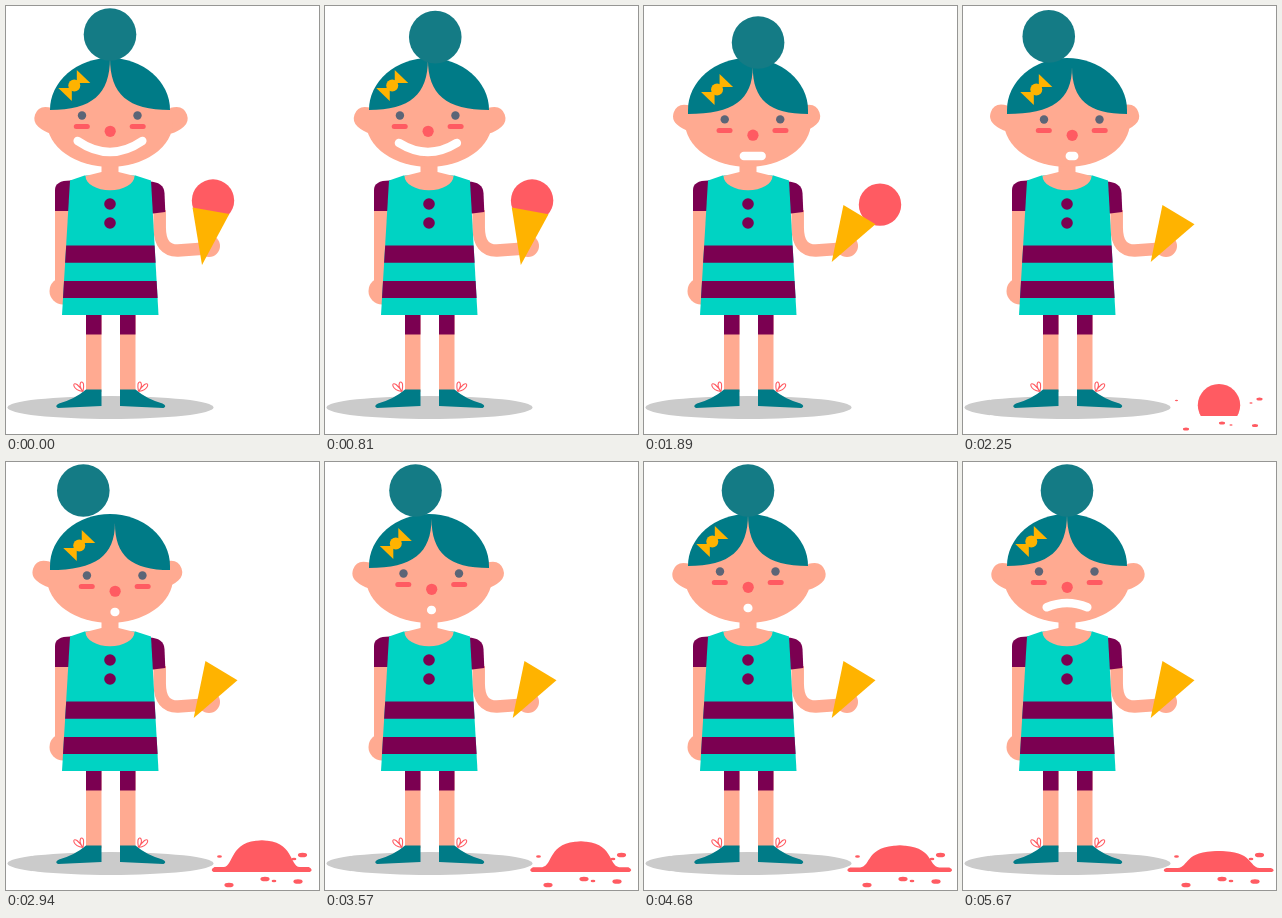
Recreate the animation shown at these times as an HTML page. Size 313x428 px, loop 5.7 s.

```html
<!DOCTYPE html>
<html lang="en">
<head>
<meta charset="utf-8">
<title>Dropped ice cream</title>
<style>
  html, body { margin: 0; width: 100%; height: 100%; overflow: hidden; background: #fff; }
  svg { display: block; width: 100%; height: 100%; }
  .skin { fill: #ffaa91; }
  .hair { fill: #007b87; }
  .plum { fill: #7b0051; }
  .mint { fill: #00d3c3; }
  .coral { fill: #ff5b62; }
  .gold { fill: #ffb300; }
  .eye { fill: #5b6577; }
  .lace { fill: none; stroke: #ff5b62; stroke-width: 1.1; }
</style>
</head>
<body>
<svg viewBox="0 0 313 428">
  <defs>
    <clipPath id="floor"><path d="M0 0H313V410H0Z"/></clipPath>
    <clipPath id="dome"><path d="M44 104A60 52 0 0 1 164 104V112H44Z"/></clipPath>
    <g id="leg">
      <path class="skin" d="M80 309H95.5V386H80Z"/>
      <path class="plum" d="M80 309H95.5V328.5H80Z"/>
      <path class="hair" d="M80 383.5H95.5V400L52 402Q48 400 53 397.5Q69 393 80 383.5Z"/>
      <path class="lace" d="M77 385.500C66 384 66 375 71 378.500Q74 381 77 385.500C71 378 76 373 77.500 378Q78 381 77 385.500"/>
    </g>
    <path id="ear" class="skin" d="M-6 -10.500Q-3 -11.300 0 -11.300A11.300 11.300 0 0 1 7 8.500Q2 13 -6 15.500L-14 0Z"/>
    <path id="wing" class="gold" d="M2.500 -2.500V-15.500L16 -2.500Z"/>
    <g id="cheek">
      <circle class="eye" cx="27.500" cy="109.500" r="4.200"/>
      <rect class="coral" x="19.700" y="118" width="16" height="5" rx="2.500"/>
    </g>
  </defs>

  <ellipse cx="104.500" cy="401.500" rx="103" ry="11.500" fill="#cbcbcb"/>
  <use href="#leg"/>
  <use href="#leg" transform="translate(209.500 0) scale(-1 1)"/>

  <circle class="skin" cx="57" cy="285" r="13.500"/>
  <path class="skin" d="M49 203H63V285H49Z"/>
  <path d="M153.700 204V222Q154 245 172 244.500L200 242.500" fill="none" stroke="#ffaa91" stroke-width="12.500"/>
  <circle class="skin" cx="203" cy="240" r="11"/>
  <path class="plum" d="M66 174.500Q49 174 49 184V205H66Z"/>
  <path class="plum" d="M143 175.500Q158 176 158.500 187L159.300 206L143 208Z"/>
  <path class="mint" d="M64 174.500L80 169H128L145 174.500L152.500 309H56Z"/>
  <path class="plum" d="M60.200 239.400H148.600L149.600 256.700H59.100ZM58 275H150.600L151.600 292H57Z"/>
  <circle class="plum" cx="104" cy="198" r="5.800"/>
  <circle class="plum" cx="104" cy="217" r="5.800"/>
  <path fill="#fff" d="M79 164H129V169.500H79Z"/>
  <path class="skin" d="M95.500 156H112.500V166L128.500 170A24.500 14.300 0 0 1 79.500 170L95.500 166Z"/>

  <use href="#ear" id="earL"/>
  <use href="#ear" id="earR"/>
  <path class="skin" d="M41 104H167V116A63 45 0 0 1 41 116Z"/>
  <g clip-path="url(#dome)">
    <path class="hair" d="M44 50H164V112H44Z"/>
    <path class="skin" id="brow"/>
  </g>
  <circle id="bun" r="26.300" fill="#147b85"/>
  <g id="face">
    <g transform="translate(68.300 79.500)">
      <use href="#wing"/>
      <use href="#wing" transform="rotate(180)"/>
      <circle class="gold" r="6"/>
    </g>
    <use href="#cheek" x="104"/>
    <use href="#cheek" transform="translate(103.500 0) scale(-1 1)"/>
    <circle class="coral" cx="104.200" cy="125.300" r="5.600"/>
    <path id="mouth" fill="none" stroke="#fff" stroke-width="8.500" stroke-linecap="round"/>
  </g>

  <g clip-path="url(#floor)"><circle class="coral" id="scoop" r="21.200"/></g>
  <path class="gold" id="cone" d="M186.500 201.500L223.300 208L196 259Z"/>
  <path class="coral" id="puddle"/>
  <g id="drops"></g>
</svg>
<script>
const LOOP = 5700, STEP = 30;
const el = id => document.getElementById(id);
const set = (node, attrs) => { for (const k in attrs) node.setAttribute(k, attrs[k]); };
const lerp = (a, b, u) => a + (b - a) * u;
const span = (t, from, to) => Math.min(1, Math.max(0, (t - from) / (to - from)));
const smooth = (t, from, to) => { const u = span(t, from, to); return u * u * (3 - 2 * u); };
const easeOut = (t, from, to) => 1 - (1 - span(t, from, to)) ** 3;

// Large and small drops alternate.
const drops = [[223, 423], [213.5, 394.5], [259, 417], [268, 419], [296.5, 393], [288, 397], [292, 419.5]]
  .map(([cx, cy], i) => {
    const node = document.createElementNS("http://www.w3.org/2000/svg", "ellipse");
    set(node, { cx, cy, class: "coral" });
    el("drops").append(node);
    return { node, size: i % 2 ? 2.4 : 4.6 };
  });

function drawHead(t) {
  const away = smooth(t, 630, 1230);
  const swing = smooth(t, 1500, 2500);
  const look = smooth(t, 1320, 1950);
  const back = smooth(t, 2850, 4290);

  const bunShift = 29 * away - 56 * swing + 27 * back;
  const dx = -5 * away + 10 * look - 5 * back;
  const dy = 4 * (look - back);
  const earY = 112.3 - dy * 0.6;
  set(el("bun"), { cx: 104 + bunShift, cy: 28.5 + 12 * (away - swing) });
  set(el("earL"), { transform: `translate(${39.3 + bunShift * 0.07} ${earY}) scale(-1 1)` });
  set(el("earR"), { transform: `translate(${170.7 - 5.5 * (away - back)} ${earY})` });
  set(el("face"), { transform: `translate(${dx} ${dy})` });

  const px = 104 + dx, side = 104 + dy, peak = 52 + Math.abs(dx) + dy;
  const k = 0.7, bend = peak + k * (side - peak);
  set(el("brow"), {
    d: `M44 ${side}C${lerp(44, px, k)} ${side} ${px} ${bend} ${px} ${peak}` +
       `C${px} ${bend} ${lerp(164, px, k)} ${side} 164 ${side}V113H44Z`
  });

  const smile = 1 - span(t, 630, 1650), frown = smooth(t, 4800, 5490);
  const half = 0.3 + 32 * (1 - span(t, 630, 2350)) + 20 * frown;
  const end = 146 - 11 * smile - 0.8 * frown;
  const mid = 146 - 5 * frown;
  set(el("mouth"), { d: `M${104 - half} ${end}Q104 ${2 * mid - end} ${104 + half} ${end}` });
}

function drawIceCream(t) {
  const tilt = span(t, 630, 1860), slide = tilt ** 3;
  const fall = span(t, 1860, 2190);
  const melt = span(t, 2280, 5670) ** 2;
  const top = 378 + 11 * melt;

  set(el("cone"), { transform: `rotate(${21 * tilt * tilt} 199.7 235.2)` });
  set(el("scoop"), {
    cx: lerp(lerp(207, 234, slide), 256, fall),
    cy: lerp(lerp(194.5, 197, slide), top + 21.2, fall * fall)
  });

  const grow = easeOut(t, 2280, 3000);
  const w = lerp(20, 50 + 5.2 * melt, grow);
  const h = lerp(20, 38 + 3 * melt, grow);
  const base = 405 + melt;
  set(el("puddle"), {
    transform: "translate(255.7 0)",
    visibility: t < 2280 ? "hidden" : "visible",
    d: `M${2 - w} 410Q${-w - 2} 408 ${3 - w} ${base}H${-h}` +
       `C${-h * 0.72} ${base - 1} ${-h * 0.86} ${top} 0 ${top}` +
       `S${h * 0.72} ${base - 1} ${h} ${base}H${w - 3}Q${w + 2} 408 ${w - 2} 410Z`
      .replace("S", `C${h * 0.86} ${top} `)
  });

  const splash = easeOut(t, 2130, 2520);
  for (const { node, size } of drops) set(node, { rx: size * splash, ry: size * splash / 2 });
}

function render(time) {
  const t = Math.floor((time % LOOP) / STEP) * STEP;
  drawHead(t);
  drawIceCream(t);
}

const began = performance.now();
function tick() {
  render(performance.now() - began);
  requestAnimationFrame(tick);
}
tick();
</script>
</body>
</html>
```
